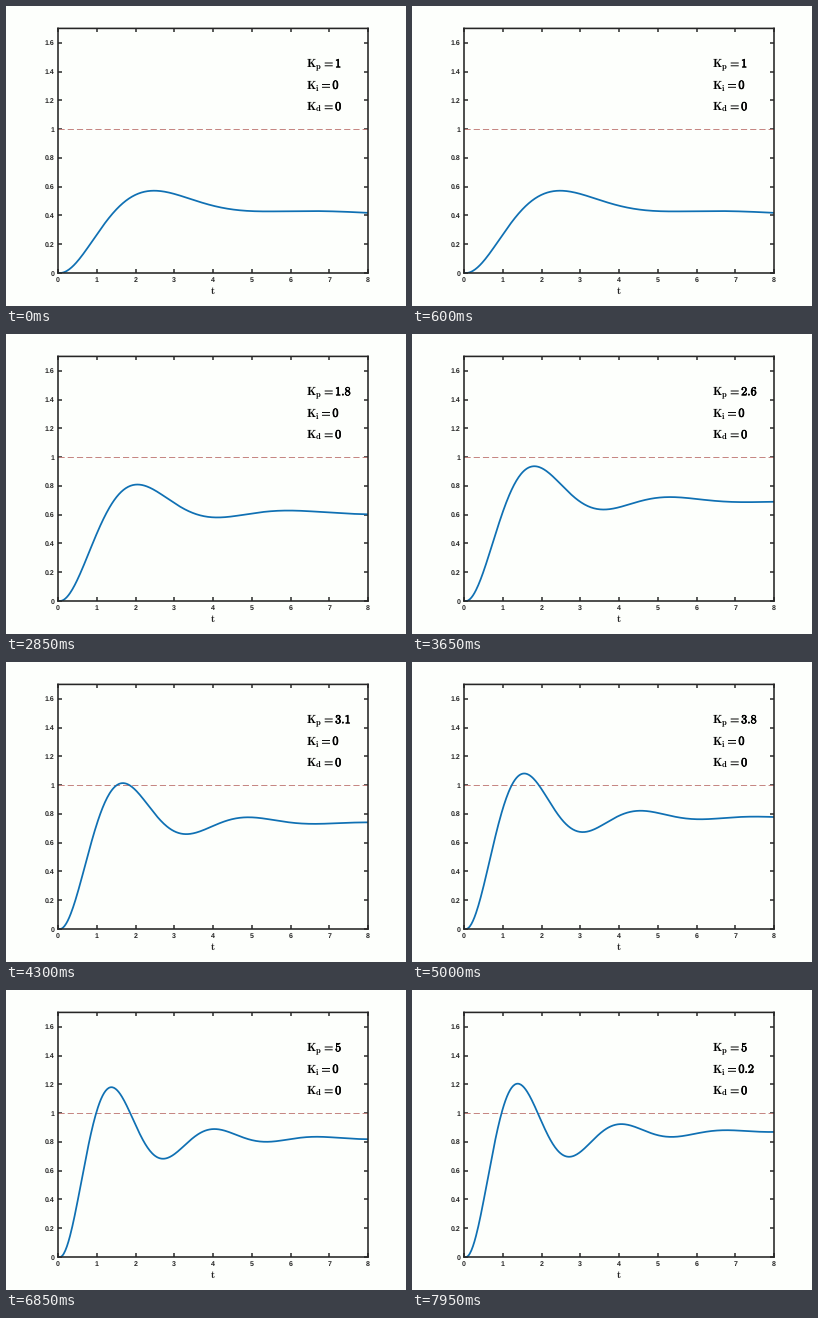
These frames come from a looping animation (400x300 px, 8 s). A matplotlib script:

```python
import numpy as np
import matplotlib.pyplot as plt
from matplotlib import patheffects
from matplotlib.animation import FuncAnimation
from matplotlib.lines import Line2D

W, H, DPI = 400, 300, 100
FRAMES, STEP = 160, 50
PX = 72 / DPI                      # points per pixel
INK, PAPER = "#262626", "#fdfffc"
BLUE, RED = "#0f70b3", "#c4827e"
LEFT, RIGHT, TOP, BOTTOM = 52, 362, 22.4, 267

plt.rcParams.update({"mathtext.fontset": "cm", "text.hinting": "no_hinting"})


def ramp(ms, start, end, low, high):
    return low + (high - low) * np.clip((ms - start) / (end - start), 0, 1)


def step_response(kp, ki, n=400, span=8.0, dead_time=0.05):
    """Closed-loop step responses for all gain pairs at once (RK4)."""
    damping, drift = 1.3, 0.04
    dt = span / n

    def rate(s):
        y, v, area = s
        err = 1 - y
        return np.array([v, kp * err + (ki - drift) * area - y - damping * v, err])

    state = np.zeros((3, len(kp)))
    out = [state[0], state[0]]
    for _ in range(n):
        a = rate(state)
        b = rate(state + dt / 2 * a)
        c = rate(state + dt / 2 * b)
        d = rate(state + dt * c)
        state = state + dt / 6 * (a + 2 * b + 2 * c + d)
        out.append(state[0])
    t = np.append(0, np.linspace(0, span, n + 1) + dead_time)
    return t, np.array(out).T


times = np.arange(FRAMES) * STEP
kp = ramp(times, 1900, 6380, 1, 5)
ki = ramp(times, 7515, 7950, 0, 0.23)
t, curves = step_response(kp, ki)

fig = plt.figure(figsize=(W / DPI, H / DPI), dpi=DPI, facecolor=PAPER)
ax = fig.add_axes([LEFT / W, 1 - BOTTOM / H, (RIGHT - LEFT) / W, (BOTTOM - TOP) / H],
                  facecolor=PAPER)
ax.patch.set_visible(False)
ax.set(xlim=(0, 8), ylim=(0, 1.7))
ticks = np.arange(9) * 0.2
ax.set_xticks(range(9))
ax.set_yticks(ticks, [f"{round(v, 1):g}" for v in ticks])
ax.tick_params(direction="in", top=True, right=True, length=3.6 * PX,
               width=1.5 * PX, color=INK, pad=3.8 * PX)
for spine in ax.spines.values():
    spine.set(color=INK, linewidth=1.6 * PX, snap=False)
for tick in ax.xaxis.get_major_ticks() + ax.yaxis.get_major_ticks():
    tick.tick1line.set_snap(False)
    tick.tick2line.set_snap(False)
for label in ax.get_xticklabels() + ax.get_yticklabels():
    label.set(family="Liberation Sans", weight="bold", size=7 * PX, color=INK)

ax.plot([0, 8], [1, 1], color=RED, lw=0.95 * PX, dashes=(6.5, 3.2), zorder=2.2)
curve, = ax.plot([], [], color=BLUE, lw=1.75 * PX, zorder=2.4)


def math(x, y, s, size, color="black", stroke=0):
    text = fig.text(x / W, 1 - y / H, rf"$\mathbf{{{s}}}$", size=size * PX,
                    color=color, va="baseline")
    if stroke:
        text.set_path_effects([patheffects.withStroke(linewidth=stroke * PX,
                                                      foreground=color)])
    return text


def gain_label(base, sub, eq_x):
    """Write 'K_sub =' on a baseline and return the text for its value."""
    math(300, base, "K", 11.8)
    math(309.3, base + 2.2, sub, 8.6)
    for dy in (1.5, 4.3):
        y = 1 - (base - dy) / H
        fig.add_artist(Line2D([eq_x / W, (eq_x + 8) / W], [y, y], color="black",
                              lw=0.95 * PX, solid_capstyle="butt", snap=False))
    # digits have no bold face here, so they are thickened by a stroke
    return math(eq_x + 10.4, base, "0", 12.2, stroke=0.6)


kp_text = gain_label(61.3, "p", 318.7)
ki_text = gain_label(82.8, "i", 316)
gain_label(104.2, "d", 318.7)
math(204.4, 288.4, "t", 10.5, INK)


def show(text, value):
    text.set_text(rf"$\mathbf{{{round(float(value), 1):g}}}$")


def draw(i):
    curve.set_data(t, curves[i])
    show(kp_text, kp[i])
    show(ki_text, ki[i])
    return curve, kp_text, ki_text


anim = FuncAnimation(fig, draw, frames=FRAMES, interval=STEP, repeat=True,
                     repeat_delay=0)
plt.show()
```
